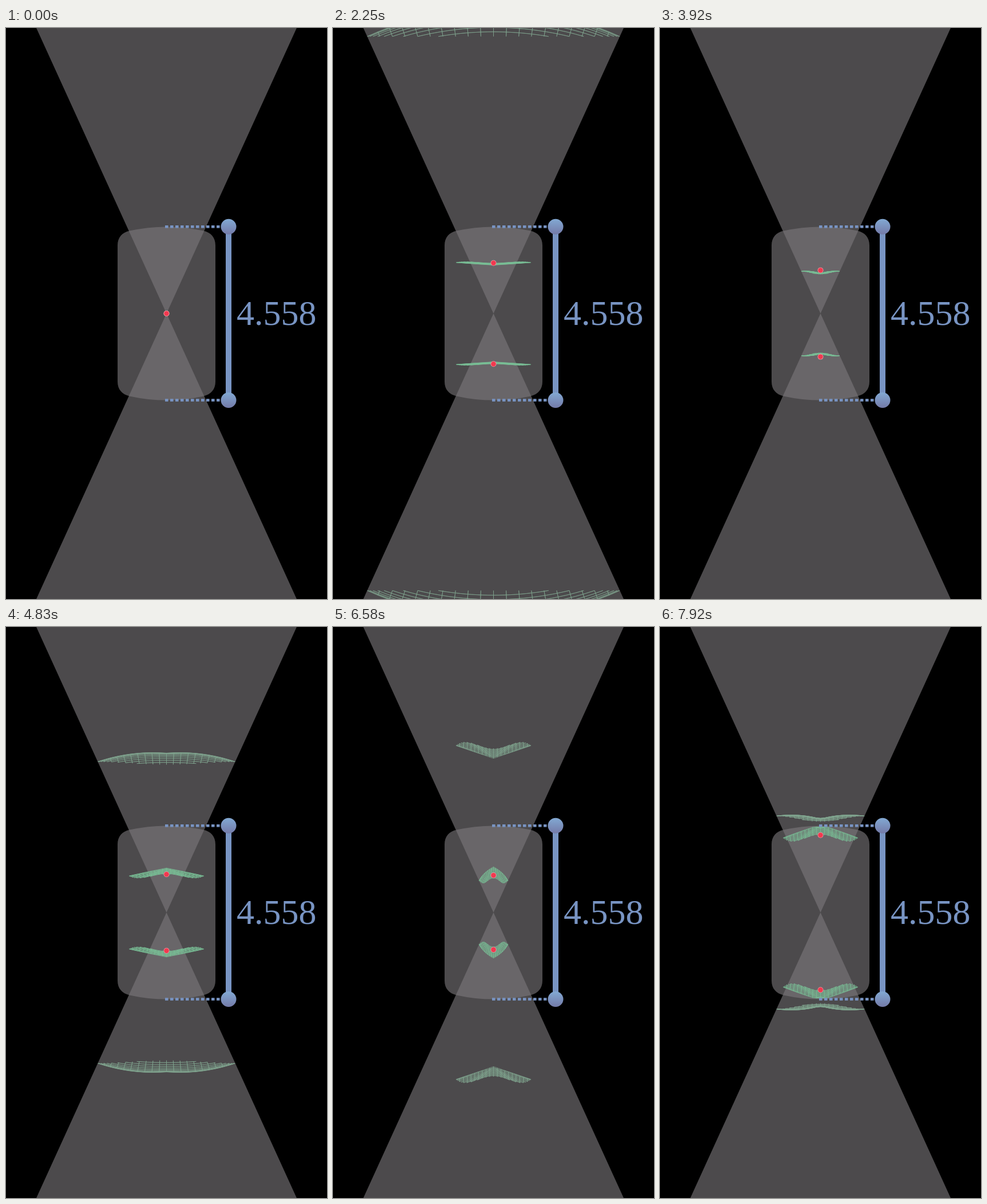
These frames come from a looping animation (561 by 998 pixels, 8 s). An HTML page with a canvas:

```html
<!DOCTYPE html>
<html lang="en">
<head>
<meta charset="utf-8">
<title>Waves between two parabolic mirrors</title>
<style>
  html, body { margin: 0; width: 100%; height: 100%; overflow: hidden; background: #000; }
  canvas { display: block; }
</style>
</head>
<body>
<canvas id="stage" width="561" height="998"></canvas>
<script>
const ctx = document.getElementById('stage').getContext('2d');
const LOOP = 8000, STEP = 1000 / 12;
const CX = 280.5, CY = 499;
const FOCAL = 150.4;        // distance from the shared focus to each mirror
const SPEED = 0.1729;       // px per ms inside the cavity
const OUTSIDE = 1.6;        // relative speed outside the cavity
const SLOPE = 0.456;        // half opening of the light cone
const BEAM = 65.6;          // half width of the parallel beam
const BLUE = '#7894c3';
const GLASS = 'rgba(123,120,123,.62)';

// Path gained or lost per reflection, by place in the unit disc.
function beamLead(q, angle) {
  return -3.7 + q * (5 + 0.5 * Math.cos(2 * angle) - 0.85 * Math.cos(4 * angle));
}
function coneLead(q, angle) {
  return -3 + q * (4.7 + 1.4 * Math.cos(2 * angle) - 0.4 * Math.cos(4 * angle));
}

// Each surface function returns [sideways offset, height] above the focus.
function innerPoint(travel, x, z) {
  const q = Math.hypot(x, z), angle = Math.atan2(z, x);
  const cos = 1 / Math.hypot(1, SLOPE * q);
  const hits = Math.floor((travel / FOCAL + 1) / 2);
  const cycle = 4 * FOCAL;
  const lead = travel % cycle < FOCAL ? coneLead : beamLead;
  const path = (travel + hits * lead(q, angle) + cycle) % cycle;
  const mirror = 2 * FOCAL / (1 + cos);
  const onRay = r => [SLOPE * x * cos * r, cos * r];
  if (path < mirror) return onRay(path);
  if (path > cycle - mirror) return onRay(path - cycle);
  const [side, height] = onRay(mirror);
  return [side, height - (path - mirror)];
}

function outerPoint(travel, pass, x, z) {
  const q = Math.hypot(x, z), angle = Math.atan2(z, x);
  const reach = FOCAL + OUTSIDE * (travel - (2 * pass - 1) * FOCAL);
  if (pass % 2 === 0) {
    return [BEAM * x, reach + OUTSIDE * (pass - 1) * beamLead(q, angle)];
  }
  const r = reach + (pass - 1) * coneLead(q, angle);
  const cos = 1 / Math.hypot(1, SLOPE * q);
  return [SLOPE * x * cos * r, cos * r];
}

function drawSurface(point, color) {
  const lines = 10, pieces = 20;
  ctx.strokeStyle = color;
  ctx.lineWidth = 0.9;
  for (const up of [-1, 1]) {
    ctx.beginPath();
    for (const across of [false, true]) {
      for (let i = -lines; i <= lines; i++) {
        const fixed = i / lines, half = Math.sqrt(1 - fixed * fixed);
        for (let j = 0; j <= pieces; j++) {
          const along = half * (2 * j / pieces - 1);
          const [side, height] = across ? point(along, fixed) : point(fixed, along);
          ctx[j ? 'lineTo' : 'moveTo'](CX + side, CY + up * height);
        }
      }
    }
    ctx.stroke();
  }
}

function drawCones() {
  ctx.fillStyle = GLASS;
  for (const y of [0, 998]) {
    ctx.beginPath();
    ctx.moveTo(CX, CY);
    ctx.lineTo(53, y);
    ctx.lineTo(508, y);
    ctx.fill();
  }
}

function drawCavity() {
  ctx.beginPath();
  ctx.moveTo(195, 380);
  ctx.bezierCurveTo(195, 366, 203, 357.5, 216, 354.6);
  ctx.quadraticCurveTo(CX, 340.2, 345, 354.6);
  ctx.bezierCurveTo(358, 357.5, 366, 366, 366, 380);
  ctx.lineTo(366, 618);
  ctx.bezierCurveTo(366, 632, 358, 640.5, 345, 643.4);
  ctx.quadraticCurveTo(CX, 657.8, 216, 643.4);
  ctx.bezierCurveTo(203, 640.5, 195, 632, 195, 618);
  ctx.fillStyle = GLASS;
  ctx.fill();
}

function disc(x, y, r, fill) {
  ctx.beginPath();
  ctx.arc(x, y, r, 0, 2 * Math.PI);
  ctx.fillStyle = fill;
  ctx.fill();
}

function drawRuler() {
  ctx.fillStyle = BLUE;
  ctx.fillRect(384, 347, 10, 303);
  for (const y of [347.3, 650.5]) {
    ctx.fillStyle = BLUE;
    for (let x = 278; x < 378; x += 9) ctx.fillRect(x, y - 2.3, 5.5, 4.6);
    const shade = ctx.createLinearGradient(0, y - 13, 0, y + 13);
    shade.addColorStop(0, '#82a8d2');
    shade.addColorStop(1, '#747ba9');
    disc(389, y, 13.5, shade);
  }
  ctx.fillStyle = BLUE;
  ctx.font = '62px "Liberation Serif", serif';
  ctx.fillText('4.558', 403, 518.5);
}

function drawDots(travel) {
  const phase = travel % (2 * FOCAL);
  const height = Math.min(phase, 2 * FOCAL - phase);
  for (const up of [-1, 1]) {
    disc(CX, CY + up * height, 5, '#e79aa2');
    disc(CX, CY + up * height, 4.2, '#f2384f');
  }
}

function render() {
  const time = Math.floor((performance.now() % LOOP + 4) / STEP) % 96 * STEP;
  const travel = time * SPEED;
  ctx.fillStyle = '#000';
  ctx.fillRect(0, 0, 561, 998);
  drawCones();
  drawCavity();
  for (let pass = 1; (2 * pass - 1) * FOCAL < travel; pass++) {
    if (travel - (2 * pass - 1) * FOCAL < 300) {
      drawSurface((x, z) => outerPoint(travel, pass, x, z), 'rgba(130,168,145,.75)');
    }
  }
  if (travel > 0) {
    drawSurface((x, z) => innerPoint(travel, x, z), 'rgba(122,190,150,.75)');
  }
  drawRuler();
  drawDots(travel);
  requestAnimationFrame(render);
}
render();
</script>
</body>
</html>
```
